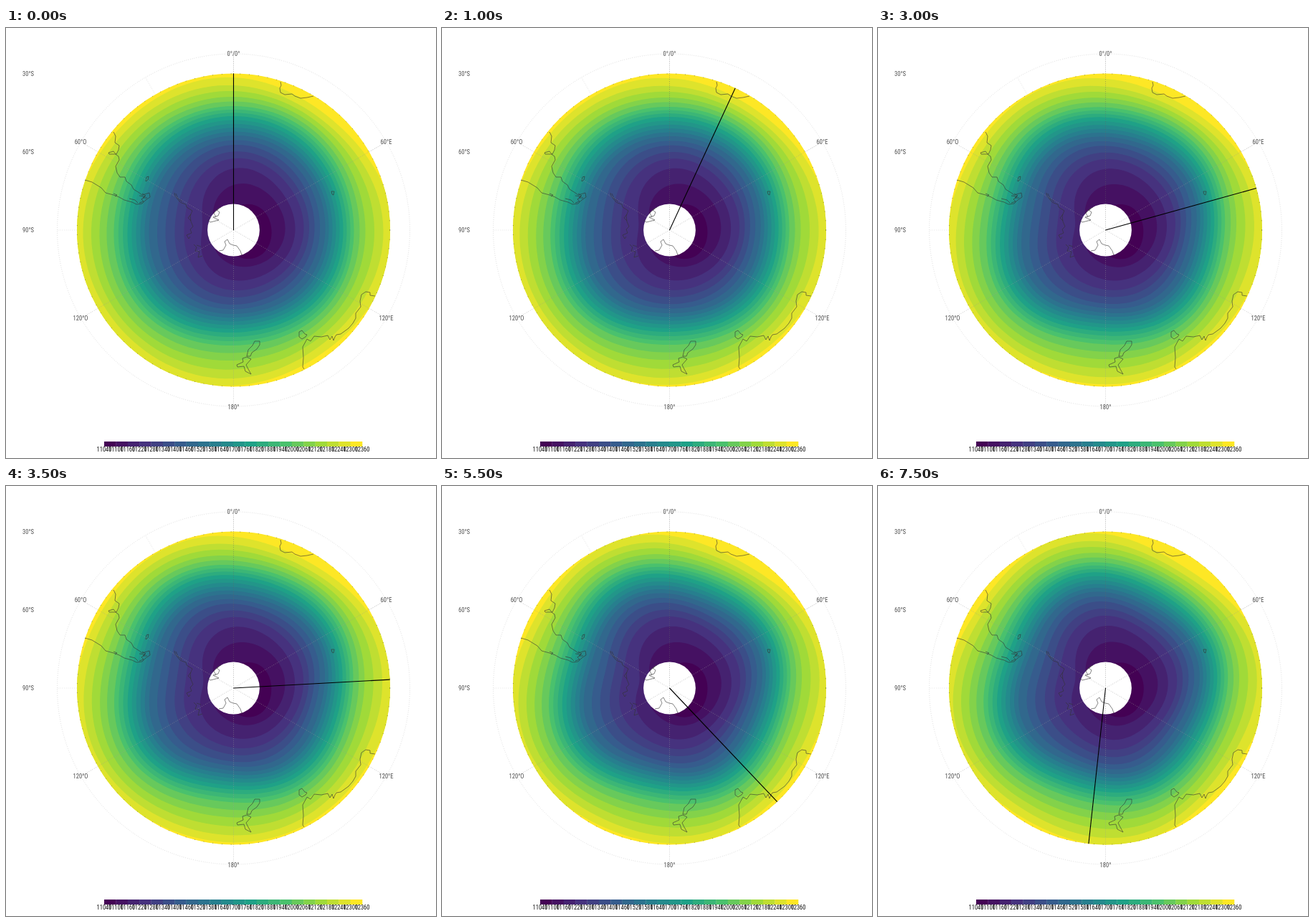
Write an HTML page that moves like this. It is 600x600 px and loops after 8 s.

```html
<!DOCTYPE html>
<html>
<head>
<meta charset="utf-8">
<style>
html, body { margin: 0; width: 100%; height: 100%; overflow: hidden; background: #fff; }
svg { display: block; width: 100vw; height: 100vh; }
text { font: 8.5px "Roboto Condensed", Roboto, sans-serif; text-anchor: middle; dominant-baseline: central; fill: #4d4d4d; }
#legend text { fill: #111; }
#coast { fill: none; stroke: #333; stroke-width: .6; stroke-linejoin: round; }
#grid { fill: none; stroke: #999; stroke-width: .6; stroke-dasharray: .8 2; }
</style>
</head>
<body>
<svg viewBox="0 0 600 600">
  <clipPath id="disc"><circle cx="317.5" cy="282" r="218.5"/></clipPath>
  <g id="bands" clip-path="url(#disc)"></g>
  <circle cx="317.5" cy="282" r="218.2" fill="none" stroke="#222" stroke-width=".8" stroke-dasharray=".8 12" opacity=".7"/>
  <circle cx="317.5" cy="282" r="36.4" fill="#fff"/>
  <g id="coast">
    <!-- South America -->
    <path d="M150 145L153 151 152 160 158 164 157 170 154 176 144 176 143 174 150 172 154 177 157 179 158 184 153 193 155 202 159 208 166 208 168 214 175 219 178 225 186 230 190 233 200 230 201 236 195 240 190 245 182 246 176 243 165 240 158 236 150 233 139 230 133 223 120 215 110 212"/>
    <path d="M186 234L194 235 189 239 192 242 186 244M190 231L195 234 191 237 197 237M150 231L155 233 152 235M172 238L180 240 184 244M195 214L196 208 199 207 198 212Z"/>
    <!-- Antarctica -->
    <path d="M235 230L236 235 238 237 242 242 245 244 251 246 252 250 260 255 257 262 258 270 261 277 257 281 259 286 252 289 255 294 257 291M262 302L266 306 264 311 270 312 268 320 274 318M237 231L240 238 246 242M258 260L254 265 258 269M266 303L272 305"/>
    <path d="M300 250L294 254 298 257 296 262 289 264 297 268 285 271 281 268M297 252L290 258 293 264"/>
    <path d="M297 311L303 310 307 303 305 298 309 295 312 301 317 303 322 304 327 311 329 317"/>
    <!-- Africa and southern islands -->
    <path d="M383 75L384 80 382 84 383 90 389 93 399 92 403 95 411 98 420 97 429 95M454 228L458 228 457 233 455 232Z"/>
    <!-- Australia -->
    <path d="M515 374L508 373 508 369 502 368 496 372 494 381 495 389 488 398 488 405 484 412 478 419 467 427 461 428 459 431 457 436 455 430 452 435 449 429 440 431 430 430 425 437 420 434 414 445 415 460 414 473 416 476"/>
    <path d="M409 424L413 422 417 427 420 428 418 431 413 434 409 431Z"/>
    <!-- New Zealand -->
    <path d="M354 437L347 437 344 443 338 449 336 458 341 458 343 453 350 448 354 442ZM336 459L330 461 331 466 322 470 323 473 332 472 334 479 342 483 338 476 335 470 342 462Z"/>
  </g>
  <g id="grid"><circle cx="317.5" cy="282" r="246" stroke="#bbb"/></g>
  <line id="hand" x1="317.5" y1="282" x2="317.5" y2="63.5" stroke="#000" stroke-width="1.1"/>
  <g id="legend"></g>
</svg>
<script>
const CX = 317.5, CY = 282, RAD = Math.PI / 180;
const STEP = 500, STEPS = 16, TURN = 360 / 29;
const BANDS = 22;

const $ = id => document.getElementById(id);
function add(parent, tag, attrs, text) {
  const el = document.createElementNS('http://www.w3.org/2000/svg', tag);
  for (const k in attrs) el.setAttribute(k, attrs[k]);
  if (text) el.textContent = text;
  return parent.appendChild(el);
}

const stops = ['440154', '46327e', '365c8d', '277f8e', '1fa187', '4ac16d', 'a0da39', 'fde725']
  .map(h => [0, 2, 4].map(i => parseInt(h.substr(i, 2), 16)));
function color(i) {
  const t = i / (BANDS - 1) * 7, k = Math.min(6, t | 0);
  return `rgb(${stops[k].map((c, j) => Math.round(c + (stops[k + 1][j] - c) * (t - k)))})`;
}

// Contour level, then its radius towards N, NE, E, SE, S, SW, W, NW
const knots = [
  [1, 30, 47, 53, 51, 34, 24, 18, 22],
  [2, 63, 70, 72, 62, 49, 37, 29, 40],
  [3, 86, 86, 86, 78, 70, 58, 44, 60],
  [4, 100, 99, 98, 90, 84, 77, 69, 81],
  [6, 119, 117, 113, 108, 104, 103, 95, 106],
  [8, 132, 132, 128, 124, 117, 122, 118, 125],
  [13, 159, 157, 153, 151, 143, 152, 148, 154],
  [16, 173, 172, 168, 168, 161, 170, 167, 171],
  [18, 186, 184, 184, 183, 182, 189, 187, 186],
  [20, 202, 198, 209, 202, 207, 209, 210, 204],
  [21, 213, 207, 223, 213, 217, 220, 222, 213]
];
function radii(level) {
  const i = Math.max(1, knots.findIndex(k => k[0] >= level));
  const a = knots[i - 1], b = knots[i], f = (level - a[0]) / (b[0] - a[0]);
  return a.slice(1).map((r, j) => r + (b[j + 1] - r) * f);
}

// Trigonometric interpolation through eight directions
const kernel = x => (1 + 2 * Math.cos(x) + 2 * Math.cos(2 * x) + 2 * Math.cos(3 * x) + Math.cos(4 * x)) / 8;
const wave = (deg, phase) => Math.cos((4 * deg - phase - 110) * RAD);

const bands = $('bands');
add(bands, 'circle', { cx: CX, cy: CY, r: 219, fill: color(21) });
const contours = [];
for (let level = 21; level > 0; level--) {
  const rs = radii(level), base = [];
  for (let d = 0; d < 360; d += 3)
    base.push(rs.reduce((s, r, j) => s + r * kernel((d - 45 * j) * RAD), 0));
  contours.push({ base, amp: Math.min(2.5, level * .35), el: add(bands, 'path', { fill: color(level - 1) }) });
}

function drawStep(n) {
  const phase = n * TURN;
  for (const { base, amp, el } of contours) {
    el.setAttribute('d', 'M' + base.map((r, i) => {
      const d = i * 3, q = r + amp * (wave(d, phase) - wave(d, 0));
      return (CX + q * Math.sin(d * RAD)).toFixed(2) + ' ' + (CY - q * Math.cos(d * RAD)).toFixed(2);
    }).join('L') + 'Z');
  }
  $('hand').setAttribute('transform', `rotate(${phase} ${CX} ${CY})`);
}

// Meridians and their labels
function spoke(deg, from, stroke) {
  add($('grid'), 'line', { x1: CX, y1: CY - from, x2: CX, y2: CY - 246, stroke, transform: `rotate(${deg} ${CX} ${CY})` });
}
for (let d = 0; d < 360; d += 60) {
  spoke(d, 0, d ? '#999' : '#666');
  if (d % 180 === 0) continue;
  spoke(d + 30 - (d > 180 ? 0 : 90), 219, '#ccc');
}
const svg = document.querySelector('svg');
[['0°/0°', 317.5, 36], ['60°E', 530.5, 159], ['120°E', 530.5, 405], ['180°', 317.5, 529],
 ['120°O', 104, 405], ['60°O', 104, 159], ['30°S', 31, 64], ['60°S', 31, 173], ['90°S', 31, 282]]
  .forEach(([s, x, y]) => add(svg, 'text', { x, y }, s));

const legend = $('legend'), cell = 360 / BANDS;
for (let i = 0; i < BANDS; i++)
  add(legend, 'rect', { x: 137 + i * cell, y: 577, width: cell + .3, height: 7, fill: color(i) });
for (let i = 0; i <= BANDS; i++)
  add(legend, 'text', { x: 137 + i * cell, y: 588 }, String(11040 + 60 * i));

let shown = -1;
function tick() {
  const n = Math.floor(performance.now() / STEP) % STEPS;
  if (n !== shown) drawStep(shown = n);
  requestAnimationFrame(tick);
}
tick();
</script>
</body>
</html>
```
